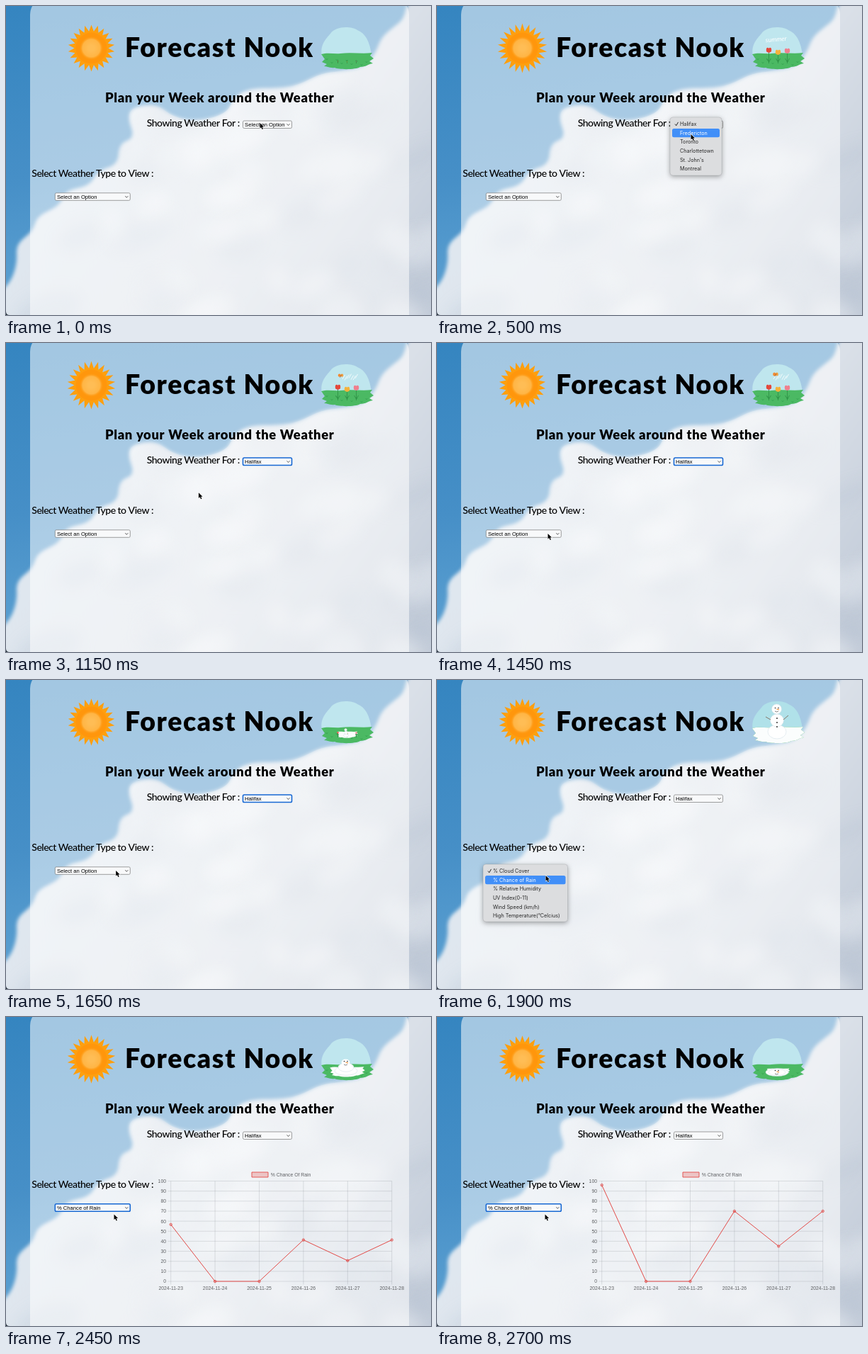
Animation, 600 px wide and 436 px high, one loop 2.75 s. Source, as an HTML page with a canvas:

```html
<!DOCTYPE html>
<html lang="en">
<head>
<meta charset="utf-8">
<title>Forecast Nook</title>
<style>
html, body { margin: 0; width: 100%; height: 100%; overflow: hidden; background: #3a86bf; }
canvas { display: block; width: 600px; height: 436px; }
</style>
</head>
<body>
<canvas id="stage" width="600" height="436"></canvas>
<script>
const W = 600, H = 436, LOOP = 2750, STEP = 50;
const ctx = document.getElementById('stage').getContext('2d');
const HUMAN = 'Lato, "Open Sans", sans-serif';
const ARIAL = '"Liberation Sans", Arial, sans-serif';
const MENU = 'Inter, Roboto, sans-serif';

// Linear interpolation through [time, value] pairs
function key(t, ...pts) {
  if (t <= pts[0][0]) return pts[0][1];
  for (let i = 1; i < pts.length; i++) {
    const [a, v] = pts[i - 1], [b, u] = pts[i];
    if (t <= b) return v + (u - v) * (t - a) / (b - a);
  }
  return pts[pts.length - 1][1];
}

function text(s, x, y, font, color = '#000', align = 'left', spacing = 0) {
  ctx.font = font;
  ctx.fillStyle = color;
  ctx.textAlign = align;
  ctx.letterSpacing = spacing + 'px';
  ctx.fillText(s, x, y);
  ctx.letterSpacing = '0px';
}

function box(c, x, y, w, h, r, fill, stroke, lw = 1) {
  c.beginPath();
  c.roundRect(x, y, w, h, r);
  if (fill) { c.fillStyle = fill; c.fill(); }
  if (stroke) { c.strokeStyle = stroke; c.lineWidth = lw; c.stroke(); }
}

function oval(x, y, rx, ry, fill, stroke, lw = 0.5) {
  ctx.beginPath();
  ctx.ellipse(x, y, Math.max(0, rx), Math.max(0, ry), 0, 0, Math.PI * 2);
  if (fill) { ctx.fillStyle = fill; ctx.fill(); }
  if (stroke) { ctx.strokeStyle = stroke; ctx.lineWidth = lw; ctx.stroke(); }
}

function line(color, lw, ...pts) {
  ctx.beginPath();
  pts.forEach(([x, y], i) => i ? ctx.lineTo(x, y) : ctx.moveTo(x, y));
  ctx.strokeStyle = color;
  ctx.lineWidth = lw;
  ctx.stroke();
}

function shape(path, fill) {
  ctx.fillStyle = fill;
  ctx.fill(new Path2D(path));
}

// Sky, clouds and translucent page panel, painted once
function makeBackdrop() {
  const cv = document.createElement('canvas');
  cv.width = W; cv.height = H;
  const c = cv.getContext('2d');
  const sky = c.createLinearGradient(0, 0, 60, H);
  sky.addColorStop(0, '#3585c0');
  sky.addColorStop(0.55, '#468fc7');
  sky.addColorStop(1, '#5fa3d3');
  c.fillStyle = sky;
  c.fillRect(0, 0, W, H);

  const edge = [[-20, 412], [6, 392], [16, 362], [14, 336], [38, 318], [44, 296],
    [76, 282], [84, 260], [118, 254], [130, 232], [158, 224], [160, 194], [182, 186],
    [172, 158], [178, 143], [212, 138], [236, 157], [270, 163], [312, 152], [322, 128],
    [345, 116], [385, 116], [412, 112], [445, 95], [472, 92], [506, 86], [522, 66],
    [530, 44], [548, 29], [562, 18], [567, -10], [640, -30]];
  const cloud = new Path2D();
  cloud.moveTo(-20, 460);
  edge.forEach(([x, y], i) => {
    const n = edge[i + 1] || [x, y];
    cloud.quadraticCurveTo(x, y, (x + n[0]) / 2, (y + n[1]) / 2);
  });
  cloud.lineTo(640, 460);
  cloud.closePath();
  const tone = c.createLinearGradient(150, 120, 560, 420);
  tone.addColorStop(0, '#e0e8f0');
  tone.addColorStop(0.55, '#dae0e8');
  tone.addColorStop(1, '#c3ccd9');
  c.filter = 'blur(2.5px)';
  c.fillStyle = tone;
  c.fill(cloud);

  let seed = 11;
  const rnd = () => (seed = seed * 16807 % 2147483647) / 2147483647;
  c.save();
  c.clip(cloud);
  c.filter = 'blur(11px)';
  for (let i = 0; i < 55; i++) {
    c.fillStyle = rnd() < 0.6 ? 'rgba(245,247,250,.4)' : 'rgba(165,180,200,.2)';
    c.beginPath();
    c.ellipse(rnd() * W, 110 + rnd() * 330, 15 + rnd() * 35, 10 + rnd() * 20, -0.4, 0, 7);
    c.fill();
  }
  c.restore();
  c.filter = 'none';

  box(c, 34, -12, 535, 470, 24, 'rgba(255,255,255,.54)');
  c.fillStyle = '#26323c';
  c.beginPath();
  c.moveTo(0, 431);
  c.quadraticCurveTo(0, H, 5, H);
  c.lineTo(0, H);
  c.fill();
  return cv;
}
const backdrop = makeBackdrop();

function sun(t) {
  const r = key(t, [0, 33], [500, 35], [900, 35], [1450, 33], [1900, 33.3], [2200, 35], [2700, 33.3]);
  const n = 22;
  ctx.save();
  ctx.translate(120.5, 59.5);
  ctx.beginPath();
  for (let i = 0; i < n * 2; i++) {
    const a = i * Math.PI / n - Math.PI / 2, d = i % 2 ? 24 : r;
    ctx.lineTo(d * Math.cos(a), d * Math.sin(a));
  }
  ctx.closePath();
  ctx.fillStyle = '#ff9f0e';
  ctx.fill();
  oval(0, 0, 22, 22, '#ff960c');
  const glow = ctx.createRadialGradient(0, 0, 4, 0, 0, 17);
  glow.addColorStop(0, '#ffbd55');
  glow.addColorStop(0.65, '#ffb545');
  glow.addColorStop(1, 'rgba(255,150,12,0)');
  oval(0, 0, 17, 17, glow);
  ctx.restore();
}

function flower(x, y, color, g) {
  if (g <= 0.02) return;
  const top = 80 - (80 - y) * g;
  line('#2c8f45', 0.8, [x, 81], [x, top]);
  line('#2c8f45', 0.8, [x - 3 * g, 74 + 3 * (1 - g)], [x, 79], [x + 3 * g, 74 + 3 * (1 - g)]);
  oval(x - 1.7 * g, top, 2 * g, 3.2 * g, color);
  oval(x + 1.7 * g, top, 2 * g, 3.2 * g, color);
  oval(x, top + 1, 2 * g, 3 * g, color);
}

function snowman(t) {
  const rise = key(t, [1600, 0], [1800, 1]);
  if (rise <= 0) return;
  const at = (a, b, c) => key(t, [1900, a], [2200, b], [2700, c]);
  const up = y => 80 - (80 - y) * rise;
  const rim = '#cfdde4', hy = up(at(41, 51, 77)), hr = at(7, 6.8, 5) * rise;
  oval(480, up(at(73, 74, 78)), at(13, 16, 16) * rise, at(10, 7, 5.5) * rise, '#fff', rim);
  oval(480, up(at(57, 64, 78)), at(9.5, 10, 12) * rise, at(9, 8, 4.5) * rise, '#fff', rim);
  oval(479.5, hy, hr, hr * at(1, 0.95, 0.6), '#fff', t < 2450 ? rim : null);
  if (rise < 0.6) return;
  const arm = key(t, [1950, 1], [2150, 0]);
  if (arm > 0) {
    ctx.globalAlpha = arm;
    line('#7a5a45', 0.8, [471, up(56)], [464, up(52)]);
    line('#7a5a45', 0.8, [489, up(56)], [496, up(50)]);
    ctx.globalAlpha = 1;
  }
  oval(477.5, hy - 1.5, 0.8, 0.8, '#222');
  oval(482, hy - 1.5, 0.8, 0.8, '#222');
  line('#f08a2a', 1.3, [479.5, hy], [483, hy + 1]);
  line('#333', 0.6, [477, hy + 3], [479.5, hy + 4], [482, hy + 3]);
  if (t < 2450) for (let i = 0; i < 3; i++) oval(480, up(at(54, 61, 76) + i * at(6, 4, 1)), 0.9, 0.9, '#222');
}

function seasons(t) {
  shape('M446 71C443 55 451 47 458 39C465 28 487 28 496 34C507 38 514 50 516 70Z',
    t > 1650 && t < 2300 ? '#b0e1e9' : '#bfe6ee');
  const ground = 'M445 68C455 65 463 68 472 67C488 65 503 68 517 66L514 70L519 74L513 78L518 81' +
    'C510 82 509 86 500 86C494 90 470 90 464 87C457 88 453 85 449 85L453 82L446 79L450 75Z';
  shape(ground, '#4bb963');
  for (let i = 0; i < 9; i++) {
    const x = 453 + i * 7, y = 76 + (i * 5) % 9;
    line('#37a452', 0.8, [x - 1.5, y - 2], [x, y], [x + 1.5, y - 2]);
  }
  const snow = key(t, [1550, 0], [1800, 1], [1950, 1], [2200, 0.9], [2700, 0.44]);
  if (snow > 0) {
    ctx.save();
    ctx.translate(482, 77);
    ctx.scale(snow, t > 1950 ? snow * 0.92 : snow);
    ctx.translate(-482, -77);
    shape(ground, '#fbfdfd');
    ctx.restore();
  }
  const grow = key(t, [0, 0.12], [450, 1], [1550, 1], [1700, 0]);
  flower(468.5, 62, '#e4483c', grow);
  flower(481.5, 65, '#f4b23c', grow);
  flower(494.5, 63, '#f07f8e', grow);

  if (t >= 350 && t < 700) {
    ctx.save();
    ctx.translate(479, 50);
    ctx.rotate(-0.08);
    ctx.globalAlpha = key(t, [350, 0.3], [450, 1], [600, 1], [700, 0.2]);
    text('summer', 0, 0, 'italic 9px ' + HUMAN, '#fff', 'center');
    ctx.restore();
  }
  if (t >= 700 && t < 1600) {
    for (let i = 0; i < 7; i++) {
      const x = 475 + i * 3, y = 45 + Math.sin(i * 1.7) * 1.5;
      line('#fff', 0.8, [x, y + 6], [x + 3.5, y]);
    }
    const x = key(t, [700, 463], [900, 468], [1450, 478], [1600, 483]);
    const y = key(t, [700, 52], [900, 48], [1450, 45], [1600, 42]);
    const flap = 1.6 + Math.abs(Math.sin(t / 130));
    oval(x - 1.8, y - 1, 2, flap, '#f28a32');
    oval(x + 1.8, y - 1, 2, flap, '#f0a040');
    line('#a3542a', 0.8, [x - 1, y + 2], [x + 1, y - 2]);
  }
  snowman(t);
}

function select(x, y, w, label, focus) {
  box(ctx, x, y, w, 10.5, 1.8, '#f8f9fa', focus ? '#1768d3' : '#777', focus ? 1.6 : 0.7);
  text(label, x + 2.6, y + 8, '7.65px ' + ARIAL);
  const cx = x + w - 5, cy = y + 5.4;
  line('#333', 0.8, [cx - 2, cy - 1], [cx, cy + 1.1], [cx + 2, cy - 1]);
}

function menu(x, y, w, h, items, active, alpha) {
  if (alpha <= 0) return;
  ctx.save();
  ctx.globalAlpha = alpha;
  ctx.shadowColor = `rgba(0,0,0,${0.35 * alpha})`;
  ctx.shadowBlur = 7;
  ctx.shadowOffsetY = 2;
  box(ctx, x, y, w, h, 4, '#dcdddf');
  ctx.shadowColor = 'transparent';
  box(ctx, x, y, w, h, 4, null, 'rgba(120,125,130,.45)', 0.5);
  items.forEach((item, i) => {
    const cy = y + 9.6 + i * 12.55, on = i === active, color = on ? '#fff' : '#262626';
    if (on) box(ctx, x + 3, cy - 6.2, w - 6, 12.4, 2.5, '#418ff8');
    if (i === 0) line(color, 1, [x + 7, cy], [x + 8.7, cy + 2.2], [x + 11.5, cy - 2.7]);
    text(item, x + 14, cy + 2.7, '7.2px ' + MENU, color);
  });
  ctx.restore();
}

const CITIES = ['Halifax', 'Fredericton', 'Toronto', 'Charlottetown', "St. John's", 'Montreal'];
const KINDS = ['% Cloud Cover', '% Chance of Rain', '% Relative Humidity', 'UV Index(0-11)',
  'Wind Speed (km/h)', 'High Temperature(°Celcius)'];
const RAIN = [96, 0, 0, 70, 35, 70];

function chart(t) {
  const left = 232.7, base = 373, dx = 62.4, dy = 14.15;
  const p = Math.min(1, (t - 2400) / 250), rise = 1 - (1 - p) ** 4;
  const font = '6.85px ' + ARIAL, grey = '#5f6164', grid = 'rgba(60,65,75,.2)';
  const red = '#e34b48', tint = 'rgba(227,75,72,.28)';
  for (let i = 0; i <= 10; i++) {
    const y = base - i * dy;
    line(grid, 0.7, [left - 4.5, y], [left + dx * 5, y]);
    text(i * 10, 226, y + 2.4, font, grey, 'right');
  }
  RAIN.forEach((v, i) => {
    const x = left + i * dx;
    line(grid, 0.7, [x, base - dy * 10], [x, base + 4.5]);
    text('2024-11-' + (23 + i), x, 385, font, grey, 'center');
  });
  box(ctx, 347, 219, 23, 7, 0, tint, red, 0.9);
  text('% Chance Of Rain', 373.7, 225, font, grey);
  const pts = RAIN.map((v, i) => [left + i * dx, base - v / 10 * dy * rise]);
  line(red, 1, ...pts);
  pts.forEach(([x, y]) => oval(x, y, 1.7, 1.7, tint, red, 0.8));
}

function cursor(t) {
  const x = key(t, [0, 358.5], [1000, 358.5], [1350, 156.5], [1450, 156.5], [1900, 153.5], [2200, 152.5]);
  const y = key(t, [0, 165], [250, 165], [500, 181], [650, 187], [900, 169], [1000, 168],
    [1350, 269], [1700, 269], [1900, 276], [2200, 278.5]);
  ctx.save();
  ctx.translate(x, y);
  const arrow = new Path2D('M0 0V7.6L1.8 6L3.1 9L4.5 8.4L3.2 5.5H5.6Z');
  ctx.lineJoin = 'round';
  ctx.lineWidth = 1.1;
  ctx.strokeStyle = '#fff';
  ctx.stroke(arrow);
  ctx.fillStyle = '#000';
  ctx.fill(arrow);
  ctx.restore();
}

function draw(t) {
  ctx.drawImage(backdrop, 0, 0);
  sun(t);
  seasons(t);
  text('Forecast Nook', 301.5, 72, '900 37.5px ' + HUMAN, '#000', 'center', 1.6);
  text('Plan your Week around the Weather', 301.7, 135.5, '900 18.4px ' + HUMAN, '#000', 'center', 0.65);
  text('Showing Weather For :', 198.7, 170, '500 14px ' + HUMAN, '#000', 'left', -0.46);
  text('Select Weather Type to View :', 36.3, 241, '500 14px ' + HUMAN, '#000', 'left', -0.5);

  select(334.5, 162, 69, t < 1050 ? 'Select an Option' : 'Halifax', t >= 1050 && t < 1700);
  select(69.3, 263.8, 106, t < 2250 ? 'Select an Option' : '% Chance of Rain', t >= 2250);
  if (t >= 2450) chart(t);

  const city = t >= 400 && t < 800 ? 1 : 0;
  menu(329, 157, 73, 82, CITIES, city, t < 200 ? 0 : key(t, [1000, 1], [1100, 0]));
  menu(65, 260, 119.5, 81, KINDS, t < 1800 ? 0 : 1,
    t < 1700 ? 0 : key(t, [2100, 1], [2150, 0.5], [2200, 0.1], [2250, 0]));
  cursor(t);
}

const start = performance.now();
function tick() {
  let t = Math.floor((performance.now() - start) % LOOP / STEP) * STEP;
  if (t > 2300 && t < 2450) t = 2300;
  draw(t);
  requestAnimationFrame(tick);
}
tick();
</script>
</body>
</html>
```
